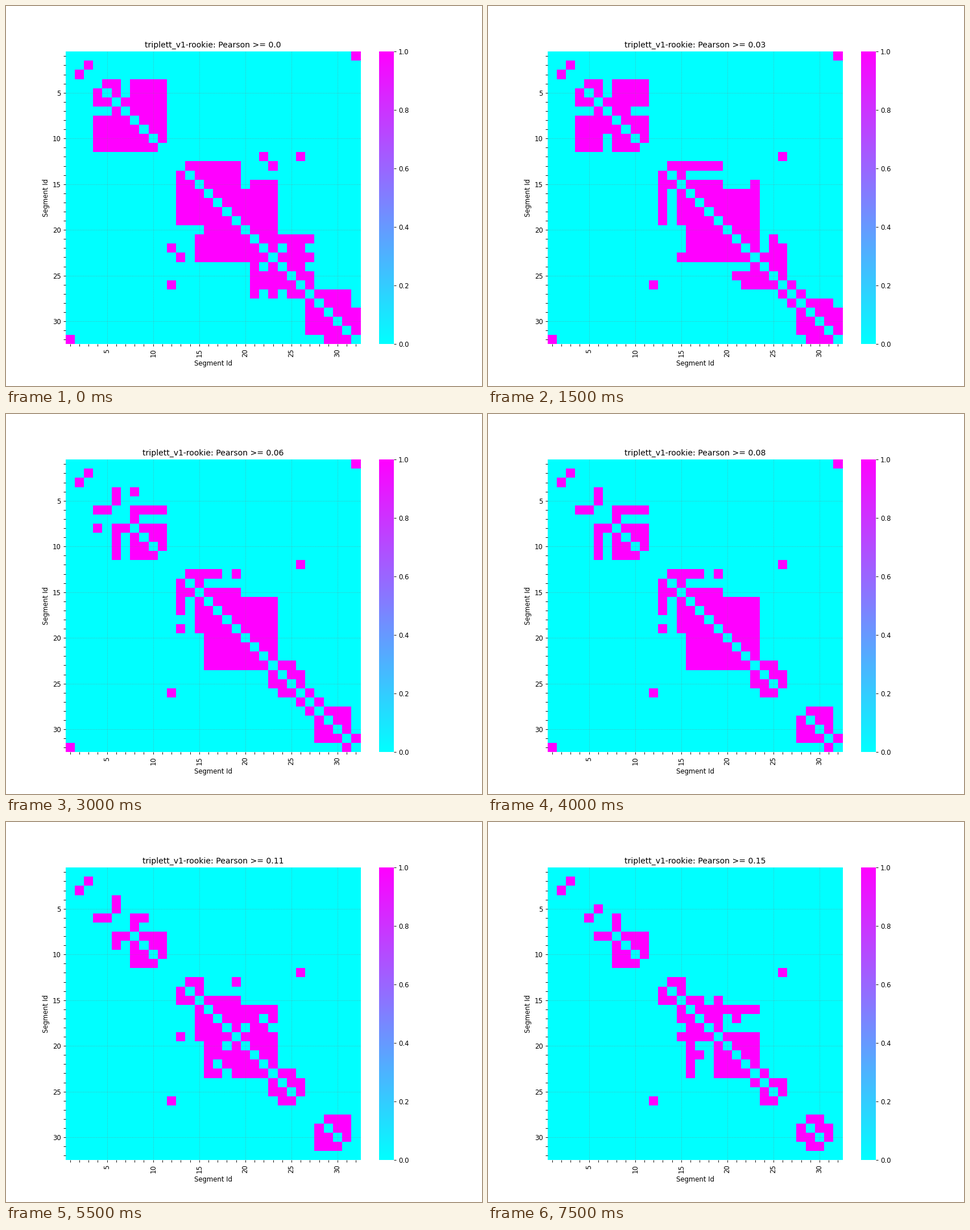
Recreate the animation shown at these times as a matplotlib script. Size 837x669 px, loop 8000 ms.

```python
from itertools import combinations

import matplotlib.pyplot as plt
import numpy as np
from matplotlib.animation import FuncAnimation
from matplotlib.ticker import MultipleLocator

SIZE = 32
STEPS = 16
DPI = 83.7

# Fully linked runs of segments, plus single links and gaps.
RUNS = [(4, 11), (13, 19), (15, 23), (21, 27), (27, 31), (29, 32)]
SINGLES = [(1, 32), (2, 3), (12, 22), (12, 26), (13, 23)]
GAPS = [(4, 7), (5, 7), (15, 20), (22, 24), (22, 27), (24, 27)]

# Links lost as the threshold reaches each hundredth: {step: {row: columns}}.
LOST = {
    1: {7: [10, 11], 12: [22], 13: [23], 14: [19], 15: [21], 21: [24, 27]},
    2: {14: [17, 18], 15: [22], 21: [26], 23: [27], 25: [27]},
    3: {14: [16], 27: [29, 30, 31]},
    4: {4: [5, 10, 11], 5: [11], 15: [23], 21: [25], 22: [26],
        29: [32], 30: [32]},
    5: {5: [8, 9, 10], 6: [7], 7: [9], 13: [18], 22: [25]},
    6: {4: [9], 23: [26]},
    7: {26: [27]},
    8: {4: [8], 27: [28]},
    9: {1: [32], 13: [17]},
    10: {6: [10], 17: [22], 18: [20]},
    11: {6: [11], 13: [16], 18: [23], 31: [32]},
    12: {15: [18], 17: [20, 23], 18: [22]},
    13: {6: [9]},
    14: {13: [19], 18: [21], 28: [31]},
    15: {4: [6], 23: [25]},
}


def link(grid, a, b, value):
    grid[a - 1, b - 1] = grid[b - 1, a - 1] = value


def links_at(step):
    grid = np.zeros((SIZE, SIZE))
    for first, last in RUNS:
        for a, b in combinations(range(first, last + 1), 2):
            link(grid, a, b, 1)
    for a, b in SINGLES:
        link(grid, a, b, 1)
    for a, b in GAPS:
        link(grid, a, b, 0)
    for k in range(1, step + 1):
        for a, cols in LOST[k].items():
            for b in cols:
                link(grid, a, b, 0)
    return grid


plt.rcParams["font.family"] = "DejaVu Sans"
fig, ax = plt.subplots(figsize=(837.001 / DPI, 669.001 / DPI), dpi=DPI)
edges = np.arange(SIZE + 1) + 0.5
mesh = ax.pcolormesh(edges, edges, links_at(0), cmap="cool", vmin=0, vmax=1)
fig.colorbar(mesh, ax=ax).outline.set_linewidth(0)

ax.set(xlim=(0.5, SIZE + 0.5), ylim=(SIZE + 0.5, 0.5),
       xlabel="Segment Id", ylabel="Segment Id")
ax.spines[:].set_visible(False)
for axis in (ax.xaxis, ax.yaxis):
    axis.set_major_locator(MultipleLocator(5))
    axis.set_minor_locator(MultipleLocator(1))
ax.tick_params(which="both", length=3.5, width=0.8)
ax.tick_params(axis="x", rotation=90)
ax.set_axisbelow(False)
ax.grid(color="gray", linestyle=":", linewidth=0.5)
title = ax.set_title("")


def draw(step):
    mesh.set_array(links_at(step))
    title.set_text(f"triplett_v1-rookie: Pearson >= {step / 100}")
    return mesh, title


anim = FuncAnimation(fig, draw, frames=STEPS, interval=500,
                     repeat=True, repeat_delay=0)
plt.show()
```
